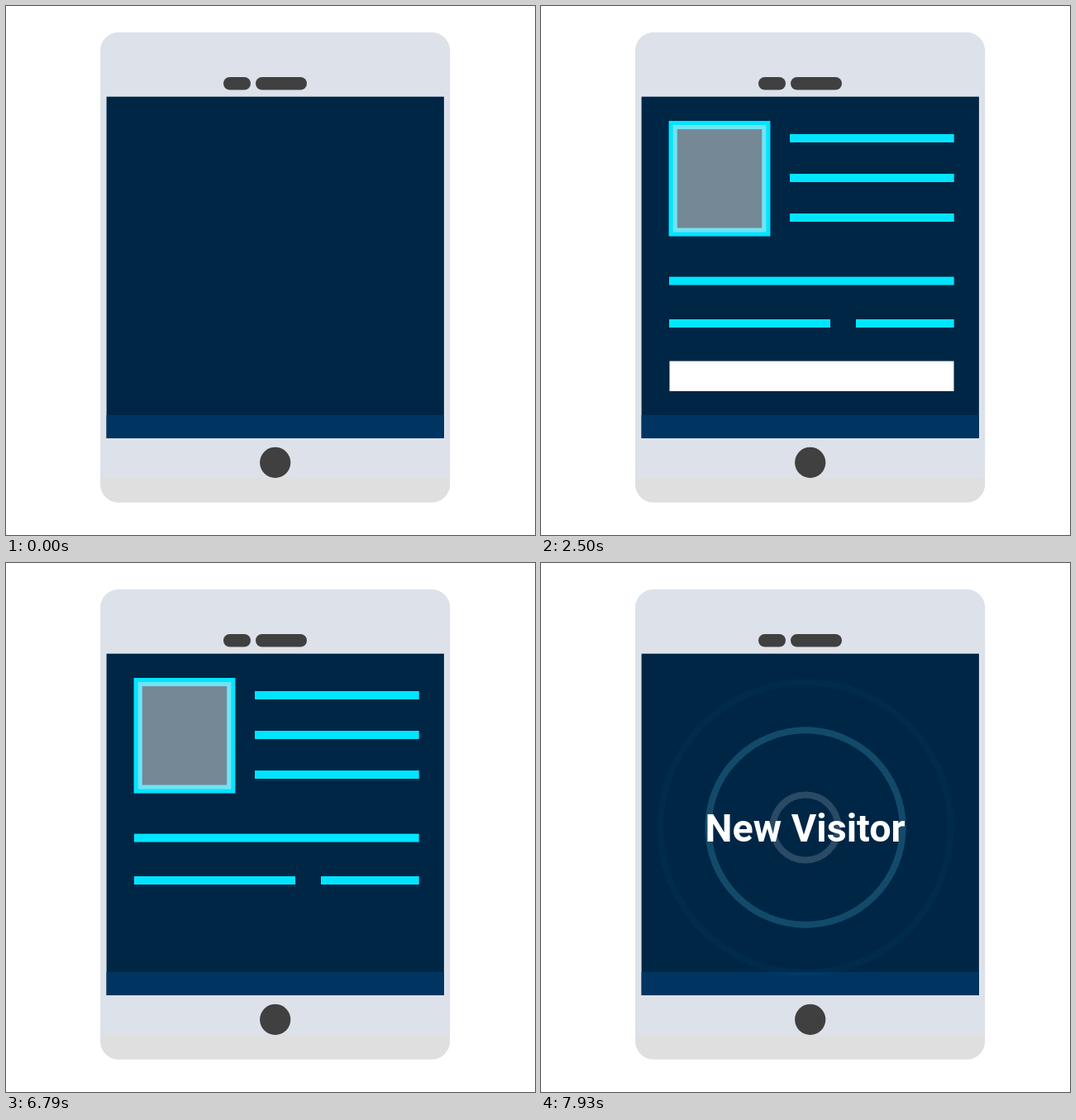
Write an HTML page that moves like this. It is 640x640 px and loops after 8000 ms.

```html
<!DOCTYPE html>
<html lang="en">
<head>
<meta charset="utf-8">
<title>Visitor tablet</title>
<style>
  html, body { margin: 0; width: 100%; height: 100%; overflow: hidden; background: #fff; }
  svg { display: block; width: 100vw; height: 100vh; }
  .label { font: 700 47.5px Roboto, Arial, sans-serif; text-anchor: middle; fill: #fff; }
</style>
</head>
<body>
<svg viewBox="0 0 640 640">
  <defs>
    <clipPath id="body"><rect x="114.5" y="32.3" width="422.2" height="568" rx="21.5"/></clipPath>
    <clipPath id="screen"><rect x="121.6" y="109.7" width="408.3" height="413.3"/></clipPath>
  </defs>
  <rect x="114.5" y="32.3" width="422.2" height="568" rx="21.5" fill="#dde2ea" stroke="#c3ced8" stroke-width=".4"/>
  <rect x="110" y="571" width="432" height="34" fill="#dfdfdf" clip-path="url(#body)"/>
  <g fill="#404040">
    <rect x="263" y="86" width="33" height="15.4" rx="7.7"/>
    <rect x="302" y="86" width="62" height="15.4" rx="7.7"/>
    <circle cx="325.7" cy="552.3" r="18.6"/>
  </g>
  <rect x="121.6" y="109.7" width="408.3" height="413.3" fill="#002646"/>
  <rect x="121.6" y="495" width="408.3" height="28" fill="#003562"/>
  <g clip-path="url(#screen)">
    <g id="form"></g>
    <g id="alert">
      <g id="rings" fill="none" stroke-width="8"></g>
      <text id="label" class="label" y="16.9">New Visitor</text>
    </g>
  </g>
</svg>
<script>
const LOOP = 8000, STEPS = 112, STEP = LOOP / STEPS;
const BASE_R = 39.5, MAX_R = 179;
const $ = id => document.getElementById(id);

const clamp = v => Math.min(1, Math.max(0, v));
const span = (t, start, dur) => clamp((t - start) / dur);
const outQuad = u => 1 - (1 - u) ** 2;
const outCubic = u => 1 - (1 - u) ** 3;
const outExpo = u => u >= 1 ? 1 : 1 - 2 ** (-10 * u);

function add(parent, tag, attrs) {
  const node = document.createElementNS('http://www.w3.org/2000/svg', tag);
  set(node, attrs);
  parent.append(node);
  return node;
}
function set(node, attrs) {
  for (const key in attrs) node.setAttribute(key, attrs[key]);
}
function show(node, on) {
  node.style.display = on ? '' : 'none';
}
function scaleAt(node, x, y, k) {
  set(node, { transform: `translate(${x} ${y}) scale(${k})` });
}

// Picture frame: nested layers, each half as wide and high as given
const layers = [
  { w: 61.4, h: 69.8, fill: '#00e5ff', start: 10 },
  { w: 56.3, h: 64.8, fill: '#70e3f4', start: 150 },
  { w: 51.2, h: 59.7, fill: '#748896', start: 290 }
].map(l => ({ ...l, node: add($('form'), 'rect', {
  x: -l.w, y: -l.h, width: 2 * l.w, height: 2 * l.h, fill: l.fill }) }));

// x, y, width, start, duration, ease
const lines = [
  [301, 155, 198.7, 848, 252, outExpo],
  [301, 203, 198.7, 914, 252, outExpo],
  [301, 251, 198.7, 1000, 330, outExpo],
  [155, 327.6, 344.7, 1230, 590, outCubic],
  [155, 379, 195, 1480, 400, outCubic],
  [381, 379, 118.7, 1640, 400, outCubic]
].map(([x, y, width, start, dur, ease]) => ({ width, start, dur, ease,
  node: add($('form'), 'rect', { x, y, height: 10, fill: '#00e5ff' }) }));

const button = add($('form'), 'rect', {
  x: -172, y: -18.2, width: 344, height: 36.4, fill: '#fff' });

// Rings leave the centre one after another, fading as they grow
const rings = [
  { color: '#fff', alpha: .165, start: 8040 },
  { color: '#5adcf0', alpha: .33, start: 7713 },
  { color: '#00e5ff', alpha: .44, start: 7387 }
].map(r => ({ ...r, node: add($('rings'), 'circle', { cx: 320, cy: 320, stroke: r.color }) }));

function drawForm(t) {
  for (const l of layers) scaleAt(l.node, 216, 208.8, outCubic(span(t, l.start, 480)));
  for (const l of lines) set(l.node, { width: l.width * l.ease(span(t, l.start, l.dur)) });

  const press = .033 * Math.sin(Math.PI * span(t, 4960, 325));
  scaleAt(button, 327.5, 447.8, outCubic(span(t, 1740, 740)) - press);
  show(button, t < 6780);
}

function drawAlert(t) {
  const pop = outCubic(span(t, 6960, 300));
  for (const r of rings) {
    const u = span(t, r.start, 640);
    set(r.node, {
      r: BASE_R * pop + (MAX_R - BASE_R) * outQuad(u),
      'stroke-width': 8 * pop,
      'stroke-opacity': r.alpha * clamp(1 - 1.12 * u)
    });
  }
  scaleAt($('label'), 319.6, 320.2, outCubic(span(t, 6985, 1270)));
}

function draw(now) {
  const t = Math.floor((now + 5) / STEP) % STEPS * STEP;
  show($('form'), t < 6850);
  show($('alert'), t > 6990);
  drawForm(t);
  drawAlert(t);
}

function tick() {
  draw(performance.now());
  requestAnimationFrame(tick);
}
tick();
</script>
</body>
</html>
```
